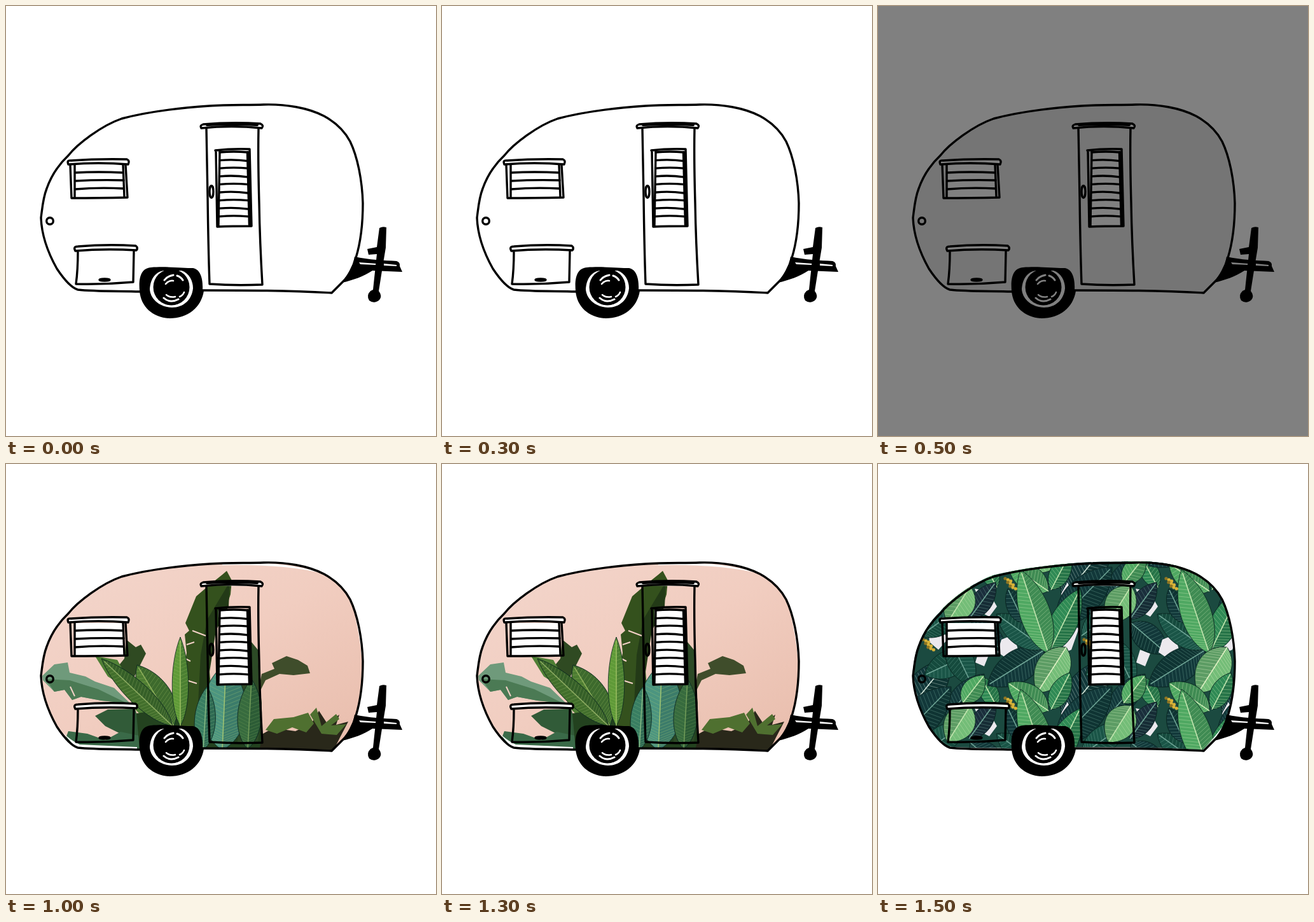
Recreate the animation shown at these times as an HTML page. Size 676 by 676 pixels, loop 2 s.

```html
<!DOCTYPE html>
<html lang="en">
<head>
<meta charset="utf-8">
<title>Camper</title>
<style>
html, body { margin: 0; width: 100%; height: 100%; overflow: hidden; background: #fff; }
svg { display: block; width: 100vw; height: 100vh; color: #fff; background: currentColor; }
.skin { display: none; }
.on { display: inline; }
.paper { fill: currentColor; }
.ink { fill: none; stroke: #000; stroke-width: 3.4; stroke-linecap: round; stroke-linejoin: round; }
.slats { stroke-width: 3.3; }
.solid { fill: #000; stroke: none; }
.shine { fill: none; stroke: currentColor; stroke-linecap: round; }
</style>
</head>
<body>
<svg id="stage" viewBox="0 0 676 676">
  <defs>
    <path id="shell" d="M55 333C57 318 58 302 64 287C70 270 82 250 98 235C112 217 150 188 182 177C220 167 275 160 320 157C350 155 380 156 405 155C440 154 475 160 500 173C520 184 533 198 541 213C553 238 560 275 561 310C561 340 558 370 550 396C546 410 538 425 530 433L512 451C440 447 380 447 309 447L210 449C180 448 140 449 113 446C103 443 90 428 80 413C66 388 56 360 55 333Z"/>
    <clipPath id="inside"><use href="#shell"/></clipPath>
    <clipPath id="loose"><use href="#shell" transform="translate(-1 -2)"/></clipPath>
    <linearGradient id="wall" x1="0" y1="0" x2="1" y2="1">
      <stop offset="0" stop-color="#f3d6cc"/>
      <stop offset=".5" stop-color="#f1cdc0"/>
      <stop offset="1" stop-color="#e8bcab"/>
    </linearGradient>
  </defs>

  <g class="skin" id="plain"></g>
  <g class="skin" id="shade"><use href="#shell" fill="#757575"/></g>

  <g class="skin" id="palms" clip-path="url(#inside)">
    <rect x="50" y="150" width="516" height="306" fill="url(#wall)"/>
    <path fill="#6f9a7b" d="M57 333L76 315L97 312L100 328L125 334L140 342L170 352L195 376L150 372L118 366L104 371L92 355L76 358L58 340Z"/>
    <path fill="#4b7a54" d="M62 338L100 340L145 354L190 376L150 372L118 366L104 371L92 355L76 358Z"/>
    <path fill="#2f4a22" d="M183 348L173 322L186 306L189 276L204 288L212 284L220 298L207 324L196 345Z"/>
    <path fill="#4f7f35" d="M140 302L175 308L194 342L220 362L266 410L228 408L205 388L182 348L160 334Z"/>
    <path fill="#315b38" d="M140 396L160 386L203 385L212 414L204 440L180 424L156 412Z"/>
    <path fill="#3a6a48" d="M90 441L98 420L128 424L156 434L180 421L214 428L212 449L108 449Z"/>
    <path fill="#23421f" d="M205 392L262 384L300 350L398 345L402 449H210Z"/>
    <path fill="#34511d" d="M340 174L347 168L355 183L353 205L347 223L330 262L318 300L322 350L310 400L300 416L274 414L278 330L284 297L281 268L288 262L282 250L299 208L320 190Z"/>
    <path fill="#233a17" d="M352 185L350 224L330 262L318 340L300 414L306 300L316 245Z"/>
    <path fill="#2c4a26" d="M365 350L386 280L396 292L398 343L402 376L396 440L364 440Z"/>
    <path fill="#3f4d2b" d="M398 350L402 330L422 322L418 313L441 302L459 308L474 317L478 329L452 332L430 330L408 340L400 356Z"/>
    <path fill="#29281a" d="M398 450L404 424L420 415L455 420L480 408L492 388L505 408L524 394L519 410L538 405L525 430L514 452Z"/>
    <path fill="#4f7030" d="M408 418L421 401L452 398L475 391L484 408L472 422L450 414L426 424ZM478 394L488 383L496 412L519 393L524 401L511 411L535 409L520 426L496 424Z"/>
    <path stroke="#f3d1c7" stroke-width="2" fill="none" d="M278 304L290 310M284 284L296 280M293 262L314 270M284 340L300 345M108 365L101 350"/>
    <g id="fronds"></g>
    <path fill="#fff" d="M340 155Q440 152 502 173Q440 157 340 159ZM549 240Q563 280 560 315Q558 280 549 240ZM75 405L113 450H206V445L116 441Q95 432 75 405Z"/>
  </g>

  <g class="skin" id="print" clip-path="url(#loose)">
    <rect x="50" y="148" width="516" height="308" fill="#1b4a40"/>
    <g id="foliage"></g>
    <path fill="#fff" d="M560 385Q545 412 513 447L512 454L545 440Z"/>
  </g>

  <g class="paper">
    <path d="M108 250H186V301H108ZM97 249L101 241L192 241L193 248ZM108 384L109 378L204 376L207 384ZM334 229H381V346H334ZM305 190L310 185L398 184L404 191L397 192L315 191Z"/>
  </g>

  <g class="ink">
    <use href="#shell"/>
    <path d="M98 249Q95 242 102 243Q145 240 190 241Q195 243 192 249Q145 245 99 249"/>
    <path d="M101 250L103 302Q145 302 191 301L188 250M108 250V300M184 250L186 300"/>
    <path class="slats" d="M109 262Q145 260 184 262M109 275Q145 273 185 274M109 288Q145 285 185 287"/>
    <path d="M109 385Q105 378 113 378Q160 374 204 377Q208 380 205 384Q155 381 109 385M113 386Q113 415 110 437Q155 438 200 434L201 386"/>
    <ellipse cx="155" cy="430.500" rx="8" ry="1.500"/>
    <circle cx="69" cy="338" r="5.300"/>
    <path d="M307 192Q304 188 310 186Q355 182 400 185Q406 188 402 192Q355 187 307 192"/>
    <path stroke-width="4" d="M316 187Q360 185 395 187"/>
    <path d="M315 192Q316 250 317 300Q318 380 320 437Q360 440 403 438Q399 370 398 310Q396 240 397 192"/>
    <path d="M329 227Q355 224 383 225L386 346Q355 346 332 347L330 228M336 229L334 345"/>
    <path d="M380 230L383 344" stroke-width="4.500"/>
    <path class="slats" id="blinds"/>
    <ellipse cx="323" cy="292" rx="3" ry="9.500"/>
  </g>

  <path class="solid" d="M210 448C208 424 214 412 228 411C250 409 280 412 294 412C306 414 310 430 309 446L311 448C307 474 286 491 257 491C231 490 212 473 210 448Z"/>
  <path class="paper" d="M226 445C227 428 236 417 249 416L276 416C288 420 294 432 294 444C292 462 279 474 261 474C241 473 227 461 226 445Z"/>
  <circle cx="260" cy="442" r="28.500"/>
  <g class="shine">
    <path stroke-width="3" d="M249 431Q253 425 263 423M269 424Q275 426 278 431M248 459Q258 468 271 461"/>
    <path stroke-width="2.500" d="M251 437Q256 431 263 432M252 454Q258 459 266 457M273 457Q278 455 280 450"/>
  </g>

  <path class="solid" d="M548 394C570 399 595 400 614 401Q620 403 619 409L623 418L576 416C562 425 546 431 528 435C540 422 545 410 548 394Z"/>
  <path class="paper" d="M555 403L582 405L581 407L557 406ZM594 405L614 407L614 409L594 408Z"/>
  <path class="solid" d="M587 349Q592 346 598 348L597 380L592 410L586 448Q592 456 587 462Q579 469 571 463Q566 455 573 448L577 446L583 390L570 391L568 382L583 379Z"/>
</svg>
<script>
const $ = id => document.getElementById(id);
const STEP = 500;

// A blade from base to tip with a shaded half, a midrib and slanted veins.
function leaf([x0, y0, x1, y1, w, fill, line]) {
  const len = Math.hypot(x1 - x0, y1 - y0);
  const turn = Math.atan2(y1 - y0, x1 - x0) * 180 / Math.PI;
  const a = len * .2, b = len * .7;
  let veins = '';
  for (let t = .12; t < .95; t += 5 / len) {
    const u = 1 - t;
    const x = 3 * a * t * u * u + 3 * b * t * t * u + len * t ** 3;
    const y = 2.8 * t * u * w;
    veins += `M${x} ${-y}L${x - y * .45} 0L${x} ${y}`;
  }
  const half = `C${b} ${w} ${a} ${w} 0 0`;
  return `<g transform="translate(${x0} ${y0}) rotate(${turn})" fill="none" stroke="${line}">
    <path fill="${fill}" stroke="#0a2420" stroke-width=".8" d="M0 0C${a} ${-w} ${b} ${-w} ${len} 0${half}"/>
    <path fill="#06251c" stroke="none" opacity=".22" d="M0 0H${len}${half}"/>
    <path d="${veins}" stroke-width=".8" opacity=".45"/>
    <path d="M0 0H${len * .96}" stroke-width="1.6"/></g>`;
}

const fronds = [
  [264, 412, 206, 316, 32, '#4d7d32', '#8fb05c'],
  [274, 412, 274, 272, 17, '#5f9a38', '#98bd60'],
  [262, 412, 150, 306, 22, '#426f2c', '#8dac62'],
  [340, 450, 346, 312, 46, '#4c9580', '#9cc273'],
  [310, 450, 316, 350, 22, '#397e62', '#83b883'],
  [380, 448, 386, 338, 25, '#376b3e', '#6f9a58']
];
$('fronds').innerHTML = fronds.map(leaf).join('');

// One repeat of the printed fabric.
const NAVY = '#12383a', DEEP = '#1a5547', MID = '#2f8a55', FRESH = '#4fa862', PALE = '#74bd78';
const SOFT = '#c4e6b0', COOL = '#6fa596';
const gaps = `<path fill="#ece9ee" d="M405 196L426 200L440 224L428 240L408 230L412 214Z
  M288 252L316 258L304 292L284 300L276 276Z M194 276L214 268L222 300L206 308L188 296Z
  M332 258L350 248L362 276L348 292L334 280Z M236 366L246 350L262 364L254 378Z
  M288 204L298 186L306 206L294 224Z M412 292L428 298L420 318L406 312Z"/>`;
const sprigs = [
  [262, 292, 172, 348, 34, NAVY, COOL],
  [262, 290, 186, 236, 28, DEEP, COOL],
  [282, 250, 368, 162, 38, NAVY, COOL],
  [320, 270, 392, 218, 28, DEEP, COOL],
  [290, 400, 366, 306, 38, NAVY, '#d5e8dc'],
  [395, 300, 326, 332, 28, DEEP, COOL],
  [398, 250, 454, 298, 28, NAVY, COOL],
  [396, 244, 438, 186, 22, '#1b2e3c', COOL],
  [366, 275, 402, 350, 28, DEEP, COOL],
  [360, 398, 420, 330, 26, NAVY, COOL],
  [230, 250, 204, 196, 20, NAVY, COOL],
  [268, 298, 318, 196, 29, MID, SOFT],
  [268, 298, 224, 166, 32, FRESH, SOFT],
  [296, 288, 250, 360, 35, PALE, '#dff0c4'],
  [268, 388, 204, 344, 27, FRESH, SOFT],
  [272, 386, 302, 328, 21, MID, SOFT],
  [398, 192, 362, 250, 32, PALE, SOFT],
  [386, 188, 420, 144, 22, FRESH, SOFT],
  [440, 382, 414, 334, 19, MID, SOFT]
];
let buds = '';
for (let i = 0; i < 9; i++) {
  const fill = i % 3 ? '#d8b238' : '#8d7423';
  for (const [x, y] of [[200, 180], [324, 276]])
    buds += `<circle cx="${x + i * 1.3 + i % 3 * 3}" cy="${y + i * 2}" r="2.6" fill="${fill}"/>`;
}
const tile = gaps + sprigs.map(leaf).join('') + buds;
let cloth = '';
for (let row = -1; row < 2; row++)
  for (let col = -1; col < 2; col++)
    cloth += `<g transform="translate(${col * 253} ${row * 188})">${tile}</g>`;
$('foliage').innerHTML = cloth;

$('blinds').setAttribute('d', Array.from({ length: 9 }, (_, i) => {
  const y = 230 + i * 12.6;
  return `M336 ${y}Q358 ${y - 2} 380 ${y + i % 2}`;
}).join(''));

const skins = ['plain', 'shade', 'palms', 'print'];
let shown = -1;
function draw(now) {
  const i = Math.floor(now / STEP) % skins.length;
  if (i !== shown) {
    shown = i;
    skins.forEach((id, k) => $(id).classList.toggle('on', k === i));
    $('stage').style.color = i === 1 ? '#808080' : '#fff';
  }
}

const start = performance.now();
function tick() {
  draw(performance.now() - start);
  requestAnimationFrame(tick);
}
tick();
</script>
</body>
</html>
```
